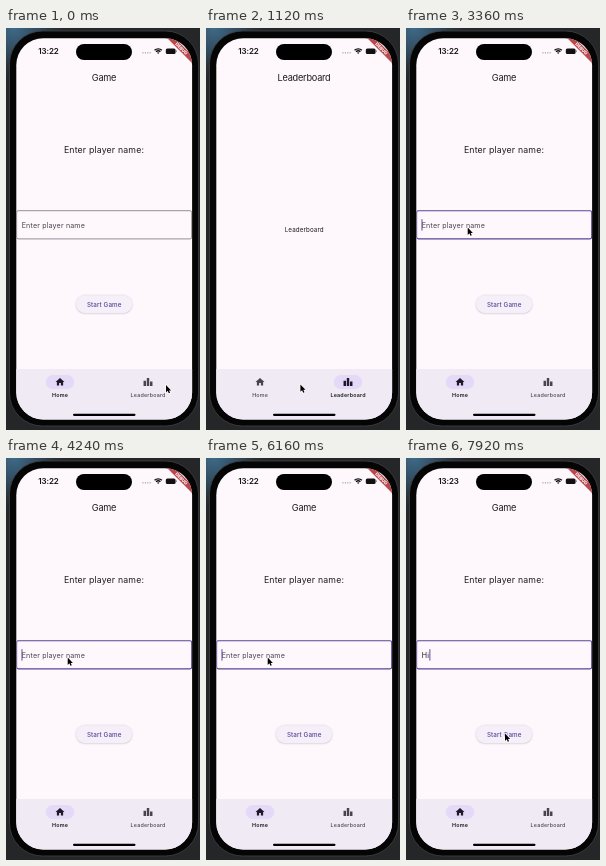
Write an HTML page with a canvas that moves like this. It is 194x402 px and loops after 8000 ms.

```html
<!DOCTYPE html>
<html lang="en">
<head>
<meta charset="utf-8">
<title>Game</title>
<style>
html, body { margin: 0; height: 100%; overflow: hidden; background: #222325; }
canvas { display: block; width: 194px; height: 402px; }
</style>
</head>
<body>
<canvas id="stage"></canvas>
<script>
const LOOP = 8000;
const INK = '#1d1b20', MUTED = '#49454f', PURPLE = '#5a4696', PAPER = '#fef7fc';
const TO_BOARD = 160, TO_HOME = 1760, FOCUS = 2880, KEY_H = 6560, KEY_I = 6800, MINUTE = 7280;

const HOUSE = new Path2D('M10 20v-6h4v6h5v-8h3L12 3 2 12h3v8z');
const BARS = new Path2D('M7.5 21H2V9h5.5zM14.75 3h-5.5v18h5.5zM22 11h-5.5v10H22z');
const ARROW = new Path2D('M0 0V7.4L1.7 5.8 2.8 8.3 4.1 7.8 3 5.4H5.2Z');

// Pointer trips: start, end, from, to
const TRIPS = [
  [640, 1480, [160, 357], [53, 356]],
  [1800, 2720, [53, 356], [61.7, 199.5]],
  [6880, 7840, [61.7, 199.5], [99, 275.5]]
];

const canvas = document.getElementById('stage');
const c = canvas.getContext('2d');
const dpr = window.devicePixelRatio || 1;
canvas.width = 194 * dpr;
canvas.height = 402 * dpr;

const clamp = v => Math.min(1, Math.max(0, v));
const span = (t, a, b) => clamp((t - a) / (b - a));
const sine = p => (1 - Math.cos(Math.PI * p)) / 2;
const mix = (a, b, p) => a + (b - a) * p;

function pill(x, y, w, h, r, fill) {
  c.beginPath();
  c.roundRect(x, y, w, h, r);
  if (fill) { c.fillStyle = fill; c.fill(); }
}

function text(str, x, y, size, color, opt = {}) {
  c.font = `${opt.weight || 400} ${size}px Inter, sans-serif`;
  c.textAlign = opt.align || 'center';
  c.letterSpacing = (opt.spacing || 0) + 'px';
  c.fillStyle = color;
  c.fillText(str, x, y);
}

function icon(path, cx, cy, color) {
  c.save();
  c.translate(cx - 5.36, cy - 5.36);
  c.scale(0.447, 0.447);
  c.fillStyle = color;
  c.fill(path);
  c.restore();
}

function backdrop() {
  c.fillStyle = '#252628';
  c.fillRect(0, 0, 194, 402);
  const glow = c.createRadialGradient(8, 0, 0, 8, 0, 60);
  glow.addColorStop(0, '#3f6a88');
  glow.addColorStop(0.45, '#2f4658');
  glow.addColorStop(1, 'rgba(37,38,40,0)');
  c.fillStyle = glow;
  c.fillRect(0, 0, 194, 70);
  pill(3.5, 3, 189, 395, 33, '#050506');
  c.strokeStyle = '#3c3d40';
  c.lineWidth = 0.9;
  c.stroke();
}

function statusBar(t) {
  text(t < MINUTE ? '13:22' : '13:23', 42.5, 26.2, 8, '#111', { weight: 600, spacing: -0.1 });
  pill(70, 16, 56, 16, 8, '#000');
  for (let i = 0; i < 4; i++) pill(136.3 + i * 2.4, 24.2, 1.3, 1.3, 0.65, '#888');

  c.strokeStyle = '#111';
  c.lineWidth = 1.3;
  for (const r of [1, 3.1, 5.2]) {
    c.beginPath();
    c.arc(152.2, 26, r, -Math.PI * 0.75, -Math.PI * 0.25);
    c.stroke();
  }
  pill(159.8, 20.4, 9.8, 5.6, 1.6, '#111');
  pill(170.1, 22.2, 0.8, 2, 0.4, '#777');
}

function debugBanner() {
  c.save();
  c.translate(186, 10);
  c.rotate(Math.PI / 4);
  c.fillStyle = '#b9474c';
  c.fillRect(-22, 12.2, 44, 5.4);
  text('DEBUG', 0, 16.5, 4.4, '#fff', { weight: 800 });
  c.restore();
}

function caretAlpha(t) {
  const since = t < KEY_H ? FOCUS : t < KEY_I ? KEY_H : KEY_I;
  const p = (t - since) / 1000 % 1;
  return p < 0.85 ? 1 - span(p, 0.5, 0.65) : span(p, 0.85, 1);
}

function nameField(t) {
  const focus = span(t, FOCUS, FOCUS + 167);
  pill(10.6, 182.7, 175.1, 28.2, 1.8);
  c.strokeStyle = focus ? PURPLE : '#79747e';
  c.lineWidth = mix(0.8, 1.1, focus);
  c.stroke();

  const typed = t < KEY_H ? '' : t < KEY_I ? 'H' : 'Hi';
  text(typed || 'Enter player name', 15.7, 200, 7.1, typed ? INK : MUTED, { align: 'left', spacing: 0.16 });
  if (!focus) return;
  const x = typed ? 16.1 + c.measureText(typed).width : 15.5;
  c.globalAlpha = caretAlpha(t);
  c.fillStyle = PURPLE;
  c.fillRect(x, 191.2, 0.95, 11.4);
  c.globalAlpha = 1;
}

function homePage(t) {
  text('Enter player name:', 98, 125, 8.75, INK, { spacing: 0.16 });
  nameField(t);
  c.shadowColor = 'rgba(0,0,0,.25)';
  c.shadowBlur = 1.6 * dpr;
  c.shadowOffsetY = 0.4 * dpr;
  pill(70, 267.2, 56.2, 18, 9, '#f5eff9');
  c.shadowColor = 'transparent';
  text('Start Game', 98.2, 278.6, 6.26, PURPLE, { weight: 500, spacing: 0.1 });
}

function destination(cx, path, label, selected, age) {
  const p = clamp(age / 500);
  const grown = 1 - Math.pow(1 - p, 3);
  const alpha = selected ? clamp(age / 100) : 1 - clamp(age / 100);
  if (alpha > 0) {
    const w = 28.6 * (selected ? mix(0.4, 1, grown) : 1);
    c.globalAlpha = alpha;
    pill(cx - w / 2, 346.9, w, 14.3, 7.15, '#e5d9f8');
    c.globalAlpha = 1;
  }
  icon(path, cx, 354, selected ? '#1d192b' : MUTED);
  text(label, cx + 0.1, 368.5, 5.36, selected ? INK : MUTED, { weight: selected ? 600 : 500, spacing: 0.2 });
}

function navBar(t, onBoard) {
  c.fillStyle = '#f0eaf4';
  c.fillRect(10, 341, 177, 52);
  const age = t < TO_BOARD ? 500 : t - (onBoard ? TO_BOARD : TO_HOME);
  destination(54, HOUSE, 'Home', !onBoard, age);
  destination(142, BARS, 'Leaderboard', onBoard, age);
  pill(67, 385.8, 62.5, 2.1, 1.05, '#000');
}

function pointer(t) {
  let [x, y] = TRIPS[0][2];
  for (const [start, end, from, to] of TRIPS) {
    if (t < start) break;
    const p = sine(span(t, start, end));
    x = mix(from[0], to[0], p);
    y = mix(from[1], to[1], p);
  }
  c.save();
  c.translate(x, y);
  c.lineJoin = 'round';
  c.lineWidth = 1.3;
  c.strokeStyle = '#fff';
  c.stroke(ARROW);
  c.fillStyle = '#000';
  c.fill(ARROW);
  c.restore();
}

function draw(now) {
  const t = now % LOOP;
  const onBoard = t >= TO_BOARD && t < TO_HOME;
  c.setTransform(dpr, 0, 0, dpr, 0, 0);
  backdrop();

  c.save();
  pill(10.3, 10.2, 175.8, 381.3, 27, PAPER);
  c.clip();
  text(onBoard ? 'Leaderboard' : 'Game', 98, 52.9, 9.2, INK, { spacing: -0.25 });
  if (onBoard) text('Leaderboard', 98.2, 203.8, 6.26, INK, { spacing: 0.1 });
  else homePage(t);
  navBar(t, onBoard);
  statusBar(t);
  debugBanner();
  c.restore();

  pointer(t);
  requestAnimationFrame(() => draw(performance.now()));
}
draw(performance.now());
</script>
</body>
</html>
```
